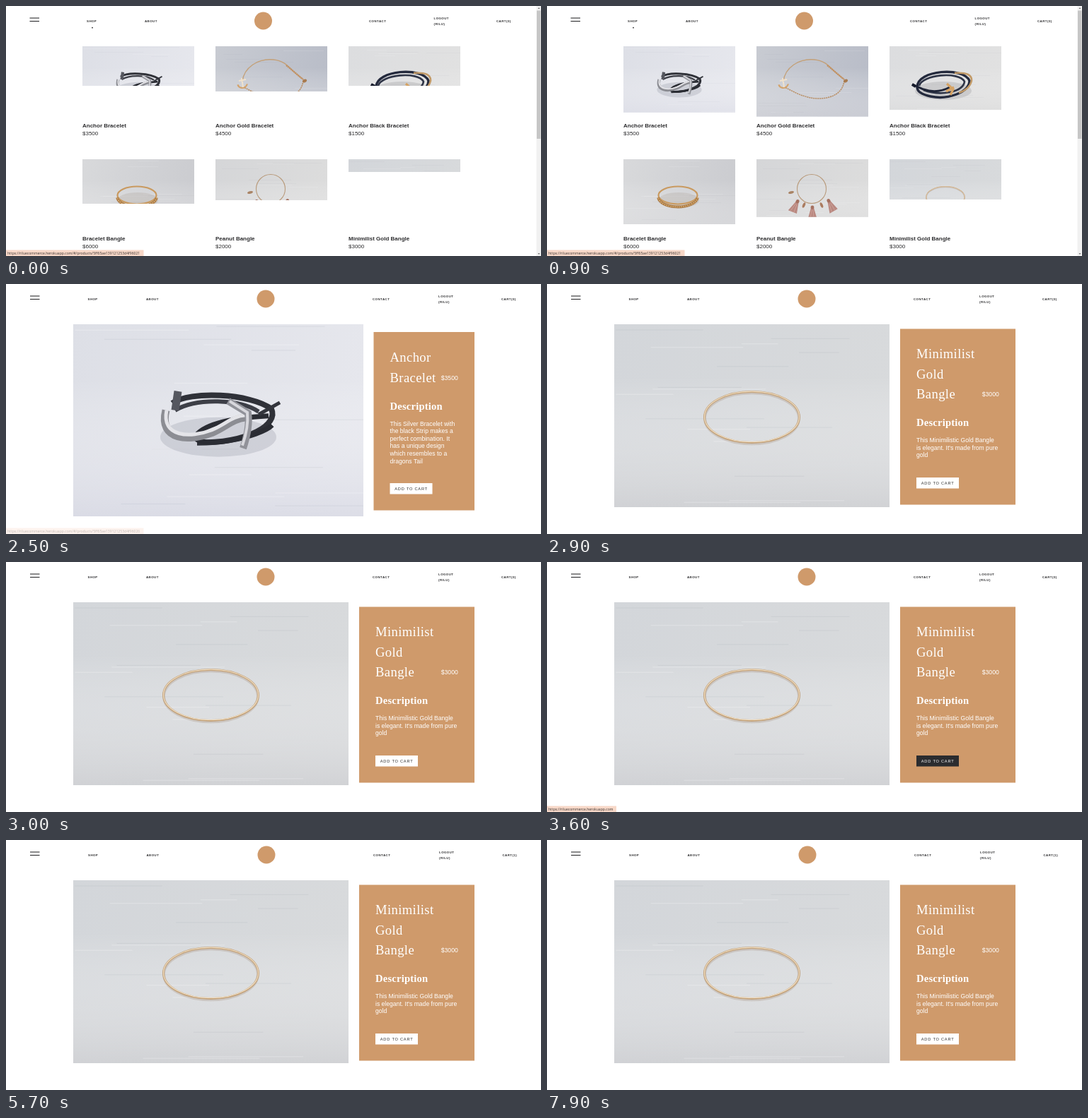
Recreate the animation shown at these times as an HTML page with a canvas. Size 756 px wide and 354 px high, loop 8000 ms.

```html
<!DOCTYPE html>
<html lang="en">
<head>
<meta charset="utf-8">
<title>Jewellery shop</title>
<style>
html, body { margin: 0; width: 100%; height: 100%; overflow: hidden; background: #fff; }
canvas { display: block; width: 756px; height: 354px; }
</style>
</head>
<body>
<canvas id="stage" width="756" height="354"></canvas>
<script>
const ctx = document.getElementById('stage').getContext('2d');
const LOOP = 8000;
const SANS = '"Liberation Sans", Arial, sans-serif';
const SERIF = '"Liberation Serif", serif';
const COPPER = '#cf9a6b';
const INK = '#2d2d2f';
const HOST = 'https://riluecommerce.herokuapp.com';
const ITEM = HOST + '/#/products/5ff65ae139121253d4f960';

const clamp = v => Math.max(0, Math.min(1, v));
const ramp = (t, a, b) => clamp((t - a) / (b - a));

function rect(x, y, w, h, color) {
  ctx.fillStyle = color;
  ctx.fillRect(x, y, w, h);
}

function text(str, x, y, font, color = INK, spacing = 0) {
  ctx.font = font;
  ctx.letterSpacing = spacing + 'px';
  ctx.fillStyle = color;
  ctx.fillText(str, x, y);
}

function stroke(color, width, dash = []) {
  ctx.strokeStyle = color;
  ctx.lineWidth = width;
  ctx.setLineDash(dash);
  ctx.stroke();
  ctx.setLineDash([]);
}

function ring(x, y, rx, ry, color, width, rot = 0, from = 0, to = Math.PI * 2, dash) {
  ctx.beginPath();
  ctx.ellipse(x, y, rx, ry, rot, from, to);
  stroke(color, width, dash);
}

function path(d, color, width, dash) {
  ctx.strokeStyle = color;
  ctx.lineWidth = width;
  ctx.setLineDash(dash || []);
  ctx.stroke(new Path2D(d));
  ctx.setLineDash([]);
}

function blob(x, y, rx, ry, color, rot = 0) {
  ctx.beginPath();
  ctx.ellipse(x, y, rx, ry, rot, 0, Math.PI * 2);
  ctx.fillStyle = color;
  ctx.fill();
}

// Every photo is drawn on a 158 x 105 board.
function board(left, right, low, seed) {
  const g = ctx.createLinearGradient(0, 0, 158, 40);
  g.addColorStop(0, left);
  g.addColorStop(1, right);
  rect(0, 0, 158, 105, g);
  const shade = ctx.createLinearGradient(0, 30, 0, 105);
  shade.addColorStop(0, 'rgba(255,255,255,0)');
  shade.addColorStop(1, low);
  rect(0, 0, 158, 105, shade);
  for (let i = 0; i < 16; i++) {
    seed = (seed * 16807) % 2147483647;
    const x = seed % 120, y = (seed >> 7) % 104, w = 20 + (seed >> 11) % 50;
    rect(x, y, Math.min(w, 158 - x), 0.5, i % 2 ? 'rgba(255,255,255,.22)' : 'rgba(90,100,115,.07)');
  }
}

function anchor() {
  board('#dddfe6', '#e6e7ed', 'rgba(216,217,228,.7)', 31);
  ctx.save();
  ctx.scale(158 / 410, 158 / 410);
  blob(205, 160, 82, 28, 'rgba(150,152,165,.3)');
  path('M140 112C165 94 250 98 280 120C290 142 250 168 175 168', '#2f3138', 8);
  path('M144 122C175 104 235 106 262 124', '#3d3f47', 6);
  path('M172 160C185 138 240 132 276 130M172 160C178 178 265 160 281 143', '#2a2c33', 7);
  path('M262 128L292 111', '#33353c', 5);
  path('M148 95L144 122', '#55575f', 11);
  path('M131 122C120 166 165 166 196 154C215 146 225 134 244 132', '#8c8d93', 11);
  path('M132 122C124 160 165 162 196 150C215 142 225 130 244 129', '#e4e4e8', 5);
  path('M219 109L247 126Q250 146 240 176', '#919299', 10);
  path('M221 109L246 125Q248 146 239 172', '#d8d8dd', 4);
  ctx.restore();
}

function goldAnchor() {
  board('#c8cbd2', '#b9bdc8', 'rgba(208,209,215,.7)', 77);
  path('M38 50C40 30 60 17 82 19C102 21 105 34 124 47', '#c3a078', 1.4);
  path('M124 49C122 66 107 74 88 74C68 74 52 64 40 58', '#b98f66', 1.5, [2.2, 0.8]);
  path('M100 27L124 47', '#c08f60', 2.2, [2, 0.7]);
  ring(38, 52, 7, 7, '#d3a36c', 2.2, 0, 0.2, 2.8);
  path('M37 45L39 58M33 49L43 47', '#f0e2cd', 2);
  blob(126, 49, 3.2, 2.2, '#a87a4e', -0.5);
}

function blackAnchor() {
  board('#dcdddf', '#e1e1e1', 'rgba(212,212,212,.6)', 113);
  blob(76, 63, 40, 13, 'rgba(130,130,135,.25)');
  path('M39 58C39 33 105 29 113 49C112 66 82 76 58 71C44 68 39 64 39 58', '#242a3d', 3.4);
  path('M42 56C46 40 98 35 106 50C104 65 72 71 48 62', '#303648', 2.6);
  path('M32 54L48 61Q68 68 87 57', '#202638', 3);
  path('M92 38Q117 36 116 49Q113 61 98 66', '#c29a67', 2.5);
  path('M81 53L90 61L86 69M80 64L91 58', '#d5a365', 3.2);
  path('M32 54L37 57', '#161c2c', 4);
}

function bangle() {
  board('#d8d9db', '#cbccd0', 'rgba(220,220,222,.6)', 219);
  blob(78, 58, 29, 11, 'rgba(150,135,120,.2)');
  ring(77, 51, 27.5, 12.5, '#c99a60', 2.2);
  ring(77, 53, 28, 14.5, '#ad7c45', 3.8, 0, 0.1, 3.04);
  ring(77, 53, 28, 14.5, '#e2c08d', 1.6, 0, 0.1, 3.04, [1.2, 1.8]);
}

function tassel(x, y, rot) {
  ctx.save();
  ctx.translate(x, y);
  ctx.rotate(rot);
  ctx.fillStyle = '#b98880';
  ctx.fill(new Path2D('M-1.5 -8L1.5 -8L6.5 9L-6.5 10Z'));
  blob(0, -7, 2.4, 2.6, '#a5705f');
  path('M-1 -3L-3 9M1 -3L2 9', '#d0a49b', 0.8);
  ctx.restore();
}

function peanut() {
  board('#d5d6d8', '#dcdcdc', 'rgba(214,214,214,.7)', 401);
  ring(78, 42, 20.5, 20.5, '#b99b7c', 1.1);
  blob(49, 47, 4, 1.8, '#a98364', -0.25);
  blob(67, 65, 1.8, 4, '#ab7c60', 0.4);
  blob(92, 65, 1.8, 4, '#ab7c60', -0.4);
  tassel(55, 66, 0.45);
  tassel(79, 75, 0);
  tassel(105, 65, -0.45);
}

function minimal() {
  board('#d3d6da', '#d8dadc', 'rgba(207,208,211,.75)', 557);
  ring(79, 54, 27, 14.6, 'rgba(150,125,100,.25)', 1.6);
  ring(79, 53.3, 27.2, 14.6, '#c2a078', 1.2);
  ring(79, 53.1, 27.2, 14.5, '#f0dfc4', 0.5);
}

function photo(paint, x, y, w, h, shown = h) {
  ctx.save();
  ctx.beginPath();
  ctx.rect(x, y, w, shown);
  ctx.clip();
  ctx.translate(x, y);
  ctx.scale(w / 158, h / 105);
  paint();
  ctx.restore();
}

// x, y, name, price, painter, height at start, time when fully loaded
const CARDS = [
  [108, 57, 'Anchor Bracelet', '$3500', anchor, 56, 1100],
  [296, 57, 'Anchor Gold Bracelet', '$4500', goldAnchor, 64, 1000],
  [484, 57, 'Anchor Black Bracelet', '$1500', blackAnchor, 56, 1200],
  [108, 217, 'Bracelet Bangle', '$6000', bangle, 63, 1200],
  [296, 217, 'Peanut Bangle', '$2000', peanut, 58, 1600],
  [484, 217, 'Minimilist Gold Bangle', '$3000', minimal, 18, 1800]
];

function header(xs, count) {
  const font = 'bold 4.4px ' + SANS;
  const label = (s, x, y) => text(s, x, y, font, INK, 0.45);
  rect(xs[0], 16.5, 13.5, 1.1, INK);
  rect(xs[0], 21, 13.5, 1.1, INK);
  label('SHOP', xs[1], 23.2);
  label('ABOUT', xs[2], 23.2);
  blob(xs[3], 21, 12.5, 12.5, COPPER);
  label('CONTACT', xs[4], 23.2);
  label('LOGOUT', xs[5], 19);
  label('(RILU)', xs[5], 27.2);
  label(`CART(${count})`, xs[6], 23.2);
}

function status(url, width, alpha = 1) {
  ctx.globalAlpha = alpha;
  rect(0, 345.5, width, 8.5, '#f7d8c8');
  text(url, 2, 352, '5.07px "Open Sans", sans-serif', '#3c3432');
  ctx.globalAlpha = 1;
}

function scrollbar() {
  rect(749.5, 0, 6.5, 354, '#f1f1f1');
  rect(750, 6.5, 5.5, 181.5, '#c6c6c6');
  ctx.fillStyle = '#777';
  ctx.fill(new Path2D('M751.5 4L753 2L754.5 4ZM751.5 350L753 352L754.5 350Z'));
}

function shop(t) {
  header([33.5, 114, 196, 363.5, 513, 604.5, 693], 0);
  if (t < 2200) blob(122, 30.7, 0.9, 0.9, INK);
  // Loading pauses briefly before the images stream in.
  for (const [x, y, name, price, paint, start, end] of CARDS) {
    const k = t < 400 ? ramp(t, 0, 100) * 0.08 : 0.08 + 0.92 * ramp(t, 300, end);
    photo(paint, x, y, 158, 105, start + (105 - start) * k);
    text(name, x, y + 115, 'bold 8px ' + SANS);
    text(price, x, y + 126, '8px ' + SANS);
  }
  scrollbar();
  status(ITEM + (t < 2000 ? '21' : '26'), 194.5);
}

function button(x, y, hover) {
  const mix = (a, b) => Math.round(a + (b - a) * hover);
  rect(x, y, 60, 15.5, `rgb(${mix(255, 43)},${mix(255, 44)},${mix(255, 47)})`);
  const c = mix(45, 255);
  text('ADD TO CART', x + 6.8, y + 10, '5.7px ' + SANS, `rgb(${c},${c},${c})`, 0.75);
}

function product(p, hover) {
  photo(p.paint, 95, 57, p.w, p.h);
  rect(p.left, p.top, 662 - p.left, p.bottom - p.top, COPPER);
  const x = p.left + 23;
  p.title.forEach((s, i) => text(s, x, p.titleY + i * 28.7, '18.6px ' + SERIF, '#fff', 0.4));
  const priceY = p.titleY + (p.title.length - 1) * 28.7 - 3;
  text(p.price, 614.7, priceY, '8.7px ' + SANS, '#fff');
  text('Description', x, priceY + 42, 'bold 14.6px ' + SERIF, '#fff', 0.2);
  p.body.forEach((s, i) => text(s, x, priceY + 64.8 + i * 10.6, '8.6px ' + SANS, '#fff'));
  button(x, p.buttonY, hover);
}

const SILVER = {
  paint: anchor, w: 410, h: 272, left: 519.5, top: 68, bottom: 320.5,
  title: ['Anchor', 'Bracelet'], titleY: 110, price: '$3500', buttonY: 282,
  body: ['This Silver Bracelet with', 'the black Strip makes a', 'perfect combination. It',
    'has a unique design', 'which resembles to a', 'dragons Tail']
};

const GOLD = {
  paint: minimal, w: 389, h: 259, left: 499, top: 63.5, bottom: 312.5,
  title: ['Minimilist', 'Gold', 'Bangle'], titleY: 105, price: '$3000', buttonY: 274,
  body: ['This Minimilistic Gold Bangle', "is elegant. It's made from pure", 'gold']
};

function detail(t) {
  if (t < 4000) header([34, 115.5, 198, 367, 518, 611, 700], 0);
  else header([34, 116, 198.5, 368, 519, 612, 701.5], 1);
  if (t < 2900) {
    product(SILVER, 0);
    if (t < 2600) status(ITEM + '26', 194.5, 0.3);
    return;
  }
  product(GOLD, ramp(t, 3300, 3600) - ramp(t, 4800, 5100));
  const shown = ramp(t, 3400, 3600) - ramp(t, 4900, 5200);
  if (shown > 0) status(HOST, 98, shown);
}

const origin = performance.now();

function draw() {
  // The screen updates ten times a second.
  const t = Math.floor(((performance.now() - origin) % LOOP) / 100) * 100;
  rect(0, 0, 756, 354, '#fff');
  if (t < 2500) shop(t);
  else detail(t);
  requestAnimationFrame(draw);
}
draw();
</script>
</body>
</html>
```
